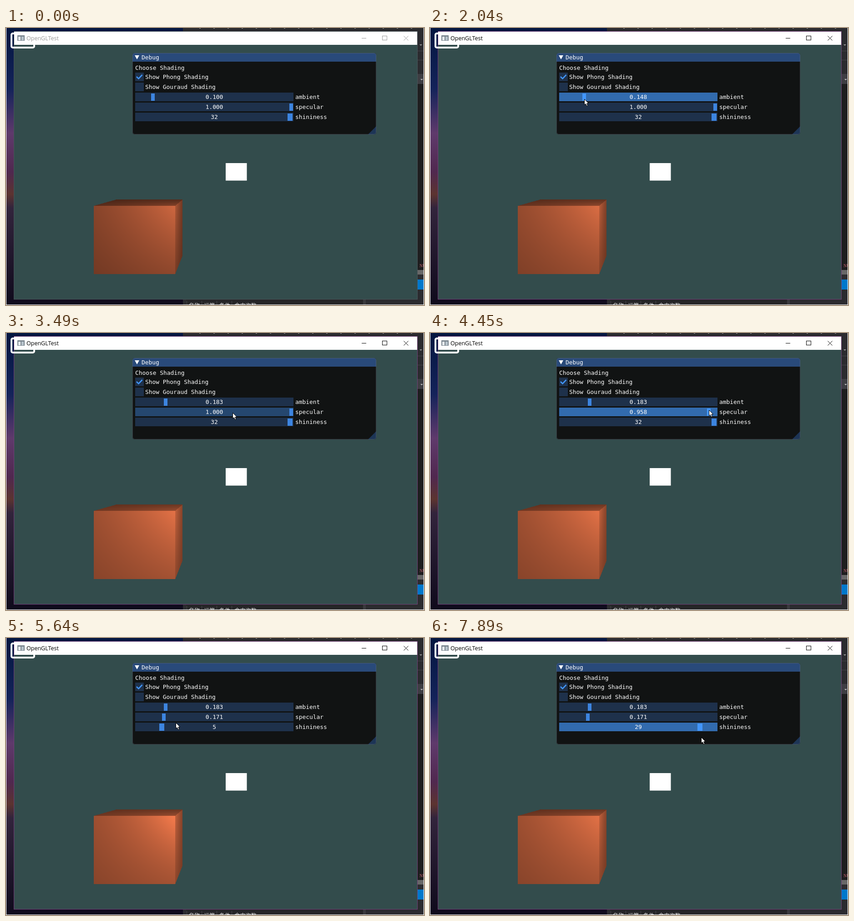
Write an HTML page with a canvas that moves like this. It is 919 px wide and 609 px high and loops after 8 s.

```html
<!DOCTYPE html>
<html lang="en">
<head>
<meta charset="utf-8">
<title>Shading test</title>
<style>
  html, body { margin: 0; width: 100%; height: 100%; overflow: hidden; background: #1e1e22; }
  canvas { display: block; }
</style>
</head>
<body>
<canvas id="stage" width="919" height="609"></canvas>
<script>
const LOOP = 8000;
const ctx = document.getElementById('stage').getContext('2d');
const MONO = '12.87px "DejaVu Sans Mono", monospace';

// The screen refreshes in bursts of three ticks, then rests.
const BURST = 691, TICK = 170, FIRST_BURST = 632;
const FIRST_TICK = -1, FOCUS_TICK = 6;

function tickAt(time) {
  const burst = Math.floor((time - FIRST_BURST) / BURST);
  const phase = time - FIRST_BURST - burst * BURST;
  return burst * 3 + Math.min(2, Math.floor(phase / TICK));
}

// Pointer path: tick, x, y
const PATH = [
  [-1, 231, 523], [1, 401, 260], [2, 306, 130], [5, 320, 146],
  [6, 339, 156], [8, 388, 164], [11, 350.8, 162],
  [12, 498, 175], [14, 622, 172], [17, 612.7, 169], [20, 357, 170], [21, 346.7, 176],
  [21.5, 342, 190], [22, 373, 185.5], [24, 504, 202],
  [27, 352, 203], [29, 384, 205], [32, 596, 218]
];

const DRAGS = [
  { slider: 0, from: 6, to: 11 },
  { slider: 1, from: 15, to: 21 },
  { slider: 2, from: 21.5, to: 21.5 },
  { slider: 2, from: 27, to: 32 }
];

const SLIDERS = [
  { label: 'ambient', start: 0.1, zero: 288.9, unit: 338, knob: 8, digits: 3 },
  { label: 'specular', start: 1, zero: 288.9, unit: 338, knob: 8, digits: 3 },
  { label: 'shininess', start: 32, zero: 290.2, unit: 10.46, knob: 11, digits: 0 }
];

function pointerAt(tick) {
  const next = Math.max(1, PATH.findIndex(([at]) => at >= tick));
  const [t0, x0, y0] = PATH[next - 1], [t1, x1, y1] = PATH[next];
  const k = (tick - t0) / (t1 - t0);
  return [x0 + (x1 - x0) * k, y0 + (y1 - y0) * k];
}

function stateAt(time) {
  const tick = tickAt(time);
  const state = { values: SLIDERS.map(s => s.start), focused: tick >= FOCUS_TICK };
  if (tick >= FIRST_TICK) state.pointer = pointerAt(tick);
  for (const { slider, from, to } of DRAGS) {
    if (tick < from) break;
    const { zero, unit, digits } = SLIDERS[slider];
    const [x] = pointerAt(Math.min(tick, to));
    state.values[slider] = +((x - zero) / unit).toFixed(digits);
    if (tick <= to) state.dragged = slider;
  }
  return state;
}

function rect(x, y, w, h, color) {
  ctx.fillStyle = color;
  ctx.fillRect(x, y, w, h);
}

function text(str, x, y, color = '#fff', font = MONO, align = 'left') {
  ctx.font = font;
  ctx.textAlign = align;
  ctx.fillStyle = color;
  ctx.fillText(str, x, y);
}

function trace(points) {
  ctx.beginPath();
  points.forEach(([x, y]) => ctx.lineTo(x, y));
}

function polygon(points, color) {
  trace(points);
  ctx.closePath();
  ctx.fillStyle = color;
  ctx.fill();
}

function line(points, color, width = 1) {
  trace(points);
  ctx.strokeStyle = color;
  ctx.lineWidth = width;
  ctx.stroke();
}

function roundFrame(x, y, w, h, radius, color, width) {
  ctx.beginPath();
  ctx.roundRect(x, y, w, h, radius);
  ctx.strokeStyle = color;
  ctx.lineWidth = width;
  ctx.stroke();
}

// The lit cube is ray cast on its own small canvas.
const BOX = { x: 192, y: 376, w: 198, h: 168 };
const EYE = [1, 1, 4.93], LIGHT = [1.2, 1, 1.35], VIEW = [0, 0, 3];
const cube = document.createElement('canvas');
cube.width = BOX.w;
cube.height = BOX.h;
const cubeCtx = cube.getContext('2d');
let cubeKey = '';

const dot = (a, b) => a[0] * b[0] + a[1] * b[1] + a[2] * b[2];
const toward = (from, to) => {
  const d = to.map((v, i) => v - from[i]);
  const len = Math.sqrt(dot(d, d));
  return d.map(v => v / len);
};

// Returns the visible point and the axis its face looks along.
function hitCube(px, py) {
  const ray = [(px - 461.5) / 793, (316 - py) / 664.5, -1];
  for (const axis of [2, 1, 0]) {
    const dist = (0.5 - EYE[axis]) / ray[axis];
    const p = EYE.map((v, i) => v + ray[i] * dist);
    if (dist > 0 && p.every((v, i) => i === axis || Math.abs(v) <= 0.5)) return { p, axis };
  }
}

function brightness({ p, axis }, [ambient, specular, shininess]) {
  const light = toward(p, LIGHT);
  const reflected = light.map((v, i) => i === axis ? v : -v);
  const shine = Math.max(0, dot(reflected, toward(p, VIEW)));
  return ambient + Math.max(0, light[axis]) + specular * shine ** shininess;
}

function drawCube(values) {
  const key = values.join();
  if (key !== cubeKey) {
    cubeKey = key;
    const image = cubeCtx.createImageData(BOX.w, BOX.h);
    for (let y = 0, i = 0; y < BOX.h; y++) {
      for (let x = 0; x < BOX.w; x++, i += 4) {
        const hit = hitCube(BOX.x + x + 0.5, BOX.y + y + 0.5);
        if (!hit) continue;
        const b = brightness(hit, values) * 255;
        image.data.set([b, b * 0.5, b * 0.31, 255], i);
      }
    }
    cubeCtx.putImageData(image, 0, 0);
  }
  ctx.drawImage(cube, BOX.x, BOX.y);
}

function drawDesktop() {
  const sky = ctx.createLinearGradient(0, 0, 0, 609);
  [[0, '#031640'], [0.22, '#14235a'], [0.38, '#5f3a6c'], [0.52, '#50284f'],
   [0.6, '#5c3430'], [0.65, '#32243c'], [1, '#0f0a1c']]
    .forEach(([at, color]) => sky.addColorStop(at, color));
  rect(0, 0, 390, 609, sky);

  rect(389, 0, 530, 609, '#2b2b2f');
  for (let x = 425; x < 900; x += 31) rect(x, 0, 3, 1, '#aaa');

  rect(905, 50, 14, 1, '#45454a');
  rect(905, 70, 14, 1, '#45454a');
  rect(905, 101, 14, 22, '#3e3e43');
  rect(905, 123, 14, 409, '#1e1e1f');
  polygon([[909, 36], [915, 36], [912, 39]], '#999');
  polygon([[911, 112], [917, 112], [914, 115]], '#bbb');
  text('NU', 909, 526, '#c0606a', '10px "Liberation Serif", serif');
  rect(905, 532, 14, 10, '#686868');
  rect(905, 542, 14, 11, '#2d2d30');
  rect(905, 553, 14, 22, '#0078cc');

  rect(396, 597, 389, 12, '#252527');
  rect(785, 597, 6, 12, '#39393d');
  ['名称', '运算', '条件', '命中次数'].forEach((name, i) => {
    text(name, 402 + i * 33.5, 615, '#ddd', '12px "Noto Sans CJK SC", "Noto Sans CJK", sans-serif');
    rect(397 + i * 33, 600, 1, 9, '#48484c');
  });

  rect(0, 0, 1, 609, '#fff');
  rect(918, 0, 1, 609, '#fff');
  rect(0, 608, 919, 1, '#fff');
}

function drawAppWindow(focused) {
  const ink = focused ? '#000' : '#999';
  rect(17, 7, 888, 590, focused ? '#74407a' : '#4a555a');
  rect(18, 8, 886, 29, '#fff');
  rect(18, 37, 886, 559, '#334c4c');

  rect(25, 16, 16, 12, '#7c8790');
  rect(27, 19, 5, 8, '#e8edf0');
  rect(34, 19, 5, 8, '#b9c5cd');
  roundFrame(12, 12, 50, 31, 3, '#fff', 4);
  text('OpenGLTest', 45, 27, ink, '12.5px "Open Sans", sans-serif');

  line([[782, 22.5], [792, 22.5]], ink);
  ctx.strokeRect(827.5, 17.5, 10, 9);
  line([[874.5, 17.5], [884.5, 27.5]], ink);
  line([[884.5, 17.5], [874.5, 27.5]], ink);
}

function drawSlider(slider, i, { values, pointer, dragged, focused }) {
  const { zero, unit, knob, digits, label } = slider;
  const y = 142 + i * 22;
  const active = dragged === i;
  const hovered = focused && dragged === undefined && pointer[0] >= 284 && pointer[0] <= 632
    && pointer[1] >= y && pointer[1] < y + 19;
  rect(284, y, 348, 19, active ? '#326bae' : hovered ? '#25476f' : '#1e314b');
  const left = Math.round(zero + unit * values[i] - knob / 2);
  rect(left, y + 2, knob, 16, active ? '#4296fa' : '#3d85e0');
  text(values[i].toFixed(digits), 458, y + 14, '#fff', MONO, 'center');
  text(label, 636, y + 14);
}

function drawPanel(state) {
  ctx.save();
  ctx.beginPath();
  ctx.roundRect(278, 55, 536, 179, 5);
  ctx.clip();
  rect(278, 55, 536, 179, '#111313');
  rect(278, 55, 536, 19, '#294a7a');
  polygon([[814, 216], [814, 234], [796, 234]], '#1d3556');
  ctx.restore();
  roundFrame(278.5, 55.5, 535, 178, 5, 'rgba(110,110,128,.4)', 1);

  polygon([[283, 60], [293, 60], [288, 69]], '#fff');
  text('Debug', 298, 69);
  text('Choose Shading', 284, 92);
  ['Show Phong Shading', 'Show Gouraud Shading'].forEach((label, i) => {
    rect(284, 98 + i * 22, 19, 19, '#1e314b');
    text(label, 306, 112 + i * 22);
  });
  line([[287, 107], [291.5, 111.5], [299.5, 103]], '#4296fa', 2.6);
  SLIDERS.forEach((slider, i) => drawSlider(slider, i, state));
}

function drawPointer([x, y]) {
  ctx.save();
  ctx.translate(Math.round(x), Math.round(y));
  const arrow = [[0.5, 0.5], [0.5, 13], [3.4, 10.6], [5.6, 15.5], [7.8, 14.5], [5.8, 9.9], [9.6, 9.6]];
  polygon(arrow, '#fff');
  line([...arrow, arrow[0]], '#000');
  ctx.restore();
}

function draw(time) {
  const state = stateAt(time);
  drawDesktop();
  drawAppWindow(state.focused);
  drawCube(state.values);
  rect(483, 297, 46.5, 38.5, '#fff');
  drawPanel(state);
  if (state.pointer) drawPointer(state.pointer);
}

const began = performance.now();
function animate() {
  draw((performance.now() - began) % LOOP);
  requestAnimationFrame(animate);
}
animate();
</script>
</body>
</html>
```
